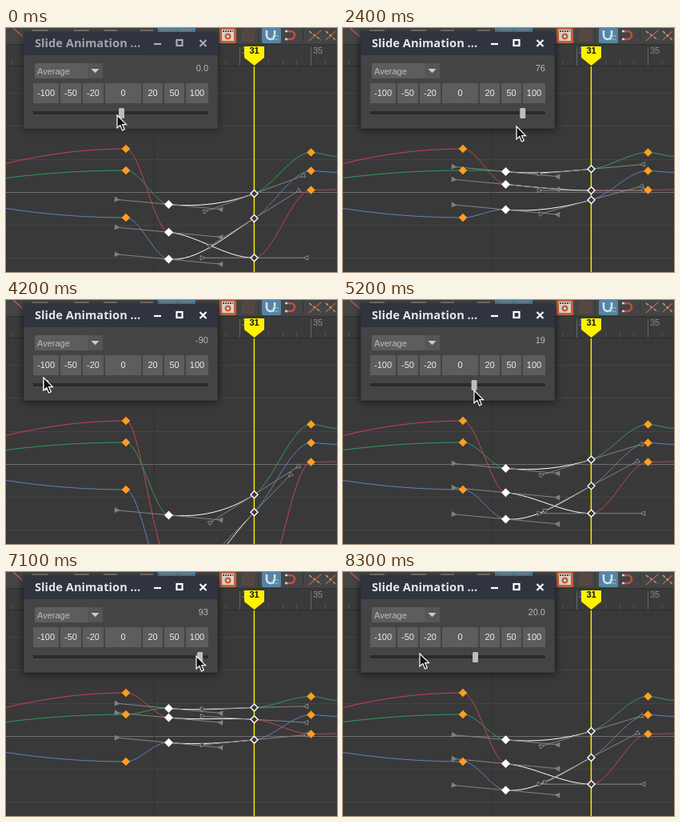
An HTML page that plays this animation: 414x305 px, repeating every 8900 ms.

```html
<!DOCTYPE html>
<html lang="en">
<head>
<meta charset="utf-8">
<title>Slide animation</title>
<style>
  html, body { margin: 0; width: 100%; height: 100%; overflow: hidden; background: #393939; }
  svg { display: block; width: 414px; height: 305px; }
  text { font: 11px "Liberation Sans", Arial, sans-serif; }
  #title { font: bold 11pt "Noto Sans", sans-serif; }
  #now { font-weight: bold; }
</style>
</head>
<body>
<svg id="stage" viewBox="0 0 414 305">
  <defs>
    <filter id="blur" x="-20%" y="-20%" width="140%" height="140%"><feGaussianBlur stdDeviation="4"/></filter>
  </defs>
  <rect width="414" height="305" fill="#393939"/>
  <g id="grid"></g>
  <g id="curves" fill="none"></g>
  <path d="M310.400 46V305" stroke="#fff200" stroke-width="1.400"/>
  <g id="handles"></g>
  <g id="keys"></g>

  <rect y="20" width="414" height="28" fill="#3a3a3a"/>
  <path d="M0 47.5H414" stroke="#2d2d2d"/>
  <g id="ruler"></g>

  <g id="toolbar">
    <rect width="414" height="20" fill="#444"/>
    <path d="M0 20.5H414" stroke="#303030"/>
    <rect x="190" width="47" height="6" fill="#5285a6"/>
    <g fill="none" stroke-width="1.3">
      <path d="M9 0L21 11M379 16L394 3M400 15L412 4" stroke="#c95b45"/>
      <path d="M33 3H52M85 3H104M122 3H139M168 3H184M195 3H210M217 3H232" stroke="#8b8780"/>
      <path d="M379 4L394 15M400 4L412 15" stroke="#b5b0a4" stroke-dasharray="4 2"/>
    </g>
    <rect x="267" width="21" height="19" rx="2" fill="#c4603a"/>
    <rect x="270" y="2" width="15" height="14" fill="#d9d4cf"/>
    <path d="M271 4H284" stroke="#4c4c4c" stroke-width="2" stroke-dasharray="2 1"/>
    <circle cx="277.500" cy="10.500" r="4" fill="#c4603a"/>
    <circle cx="277.500" cy="10.500" r="1.500" fill="#e8e2dc"/>
    <path d="M296 3H310V16H296ZM296 7H310" fill="#57453f" stroke="#5f4f49"/>
    <rect x="320" width="24" height="19" rx="2" fill="#5285a6"/>
    <g fill="none" stroke-width="2.600">
      <path d="M326 3V9A5 5 0 0 0 336 9V3" stroke="#d9dfe3"/>
      <path d="M331 14H341M333 10H341" stroke="#c9d6de" stroke-width="1" stroke-dasharray="2 1"/>
      <path d="M351 4H356A5 5 0 0 1 356 14H351" stroke="#b9543f"/>
      <path d="M349 4H352M349 14H352" stroke="#d0d0d0"/>
    </g>
    <path d="M315.500 1V18M371.500 1V18" stroke="#353535"/>
  </g>
  <path d="M298 23H323V37L310.500 47L298 37Z" fill="#fff200"/>
  <text id="now" x="310.500" y="32" text-anchor="middle" fill="#111">31</text>

  <rect id="shadow" x="21" y="6" width="245" height="122" rx="3" filter="url(#blur)"/>
  <path d="M22 126V8A3 3 0 0 1 25 5H262A3 3 0 0 1 265 8V126Z" fill="#444"/>
  <path d="M22 34V8A3 3 0 0 1 25 5H262A3 3 0 0 1 265 8V34Z" fill="#2f343f"/>
  <path d="M22.500 34V125.500H264.500V34" fill="none" stroke="#393c42"/>
  <text id="title" x="36" y="24">Slide Animation ...</text>
  <g id="controls" fill="none" stroke-width="2.200">
    <path d="M185 20H194"/>
    <rect x="213.500" y="15" width="7" height="7"/>
    <path d="M242.500 15L250.500 23M250.500 15L242.500 23"/>
  </g>
  <rect x="36" y="44" width="66" height="19" rx="1" fill="#5d5d5d"/>
  <rect x="102" y="44" width="19" height="19" rx="1" fill="#555"/>
  <path d="M106.500 51H116.500L111.500 56.200Z" fill="#ccc"/>
  <text x="39" y="58" fill="#bbb">Average</text>
  <text id="value" x="253" y="54" text-anchor="end" fill="#bbb"></text>
  <g id="buttons"></g>
  <rect x="34" y="104" width="219" height="4" rx="1" fill="#2a2a2a"/>
  <rect id="knob" y="100" width="7" height="13" rx="1.500" fill="#bdbdbd"/>
  <path id="cursor" d="M0 0V16L3.800 12.500L6.500 19L9.300 17.800L6.600 11.600H11.500Z" fill="#111" stroke="#fff" stroke-width="1.200"/>
</svg>
<script>
const LOOP = 8900, STEP = 100;
const KEY_X = [150, 203.5, 310.5, 381.5];
const HANDLE = 64.5;
const CURVES = [
  { color: '#c9434f', y: [151, 255.3, 287.3, 202.5], left: 169.5, right: 202 },
  { color: '#2f9c5b', y: [178, 220.5, 207, 155.5], left: 187.5, right: 160.5 },
  { color: '#5b82c4', y: [237, 289, 238, 178.5], left: 225.5, right: 180.5 }
];
// time, slider value, pointer x, pointer y
const TRACK = [
  [0, 0, 139, 109], [100, 0, 141, 109], [200, 0, 141, 109], [900, 37.5, 184, 109],
  [1100, 69, 217, 111], [1700, 100, 260, 115], [1800, 100, 260, 115], [1900, 100, 262, 116],
  [2100, 100, 262, 116], [2400, 76.2, 217, 123], [3000, -22, 118, 114], [3800, -94, 45, 97],
  [4100, -94, 45, 97], [4200, -90, 47, 97], [5000, -12, 131, 111], [5200, 18.6, 164, 113],
  [5900, 75, 223, 110], [6500, 100, 250, 105], [6800, 100, 250, 105], [7100, 93.2, 238, 105],
  [7700, 38, 184, 108], [8000, 24, 169, 109], [8100, 24, 169, 109], [8200, 21, 136, 106],
  [8300, 20, 96, 102]
];

const $ = id => document.getElementById(id);
function add(parent, tag, attrs, label) {
  const node = document.createElementNS('http://www.w3.org/2000/svg', tag);
  set(node, attrs);
  if (label !== undefined) node.textContent = label;
  return $(parent).appendChild(node);
}
function set(node, attrs) {
  for (const name in attrs) node.setAttribute(name, attrs[name]);
}

// Slope through three points, flat at extremes and limited against overshoot.
function autoSlope(x0, y0, x1, y1, x2, y2) {
  const a = (y1 - y0) / (x1 - x0), b = (y2 - y1) / (x2 - x1);
  if (a * b <= 0) return 0;
  const mean = (y2 - y0) / (x2 - x0);
  return Math.sign(a) * Math.min(Math.abs(mean), 3 * Math.abs(a), 3 * Math.abs(b));
}

function sample(t, col) {
  const last = TRACK.length - 1;
  if (t >= TRACK[last][0]) return TRACK[last][col];
  let i = 0;
  while (TRACK[i + 1][0] <= t) i++;
  const slope = k => k === 0 || k === last ? 0 : autoSlope(
    TRACK[k - 1][0], TRACK[k - 1][col], TRACK[k][0], TRACK[k][col], TRACK[k + 1][0], TRACK[k + 1][col]);
  const p = TRACK[i], q = TRACK[i + 1], d = q[0] - p[0], s = (t - p[0]) / d, r = 1 - s;
  return r * r * (1 + 2 * s) * p[col] + s * s * (3 - 2 * s) * q[col]
    + d * s * r * (r * slope(i) - s * slope(i + 1));
}

function segment(x0, y0, m0, x1, y1, m1) {
  const d = (x1 - x0) / 3;
  return `M${x0} ${y0}C${x0 + d} ${y0 + m0 * d} ${x1 - d} ${y1 - m1 * d} ${x1} ${y1}`;
}
const diamond = (x, y, r) => `M${x - r} ${y}L${x} ${y - r}L${x + r} ${y}L${x} ${y + r}Z`;

for (let y = 81.5; y < 305; y += 41.25)
  add('grid', 'path', { d: `M0 ${Math.floor(y) + .5}H414`, stroke: Math.abs(y - 205) < 2 ? '#707070' : '#454545' });
add('grid', 'path', { d: 'M185.5 48V305', stroke: '#313131' });

for (let frame = 14; frame <= 36; frame++) {
  const x = Math.round(310 + (frame - 31) * 17.8) + .5, major = frame % 5 === 0;
  add('ruler', 'path', { d: `M${x} ${major ? 24 : 40}V47`, stroke: major ? '#666' : '#505050' });
  if (major) add('ruler', 'text', { x: x + 2.5, y: 32, fill: '#909090' }, frame);
}

[[-100, 34, 66], [-50, 68, 94], [-20, 96, 122], [0, 124, 169], [20, 171, 196], [50, 198, 223], [100, 225, 253]]
  .forEach(([label, x0, x1]) => {
    add('buttons', 'rect', { x: x0, y: 69, width: x1 - x0, height: 25, rx: 1, fill: '#5d5d5d' });
    add('buttons', 'text', { x: (x0 + x1) / 2, y: 85, 'text-anchor': 'middle', fill: '#eee' }, label);
  });

for (const c of CURVES) {
  c.mean = (c.y[0] + c.y[3]) / 2;
  const startSlope = 2 * (c.y[0] - c.left) / 150;
  add('curves', 'path', {
    d: segment(0, c.left, startSlope, 150, c.y[0], 0) + segment(381.5, c.y[3], 0, 414, c.right, 0),
    stroke: c.color
  });
  c.sides = add('curves', 'path', { stroke: c.color });
  c.middle = add('curves', 'path', { stroke: '#fff' });
  c.lines = add('handles', 'path', { fill: 'none', stroke: '#858585' });
  c.solid = add('handles', 'path', { fill: '#808080' });
  c.hollow = add('handles', 'path', { fill: '#393939', stroke: '#8c8c8c' });
  for (const k of [0, 3])
    add('keys', 'path', { d: diamond(KEY_X[k], c.y[k], 5.3), fill: '#ff9d20' });
  c.keyA = add('keys', 'path', { fill: '#fff' });
  c.keyB = add('keys', 'path', { fill: '#393939', stroke: '#fff', 'stroke-width': 1.4 });
}

// Both handles of one key: the line and the arrowheads that point at the key.
function handlePaths(x, y, slope, size) {
  const len = Math.hypot(1, slope), ux = 1 / len, uy = slope / len;
  let line = '', heads = '';
  for (const side of [-1, 1]) {
    const dx = ux * side, dy = uy * side, hx = x + dx * HANDLE, hy = y + dy * HANDLE;
    const bx = hx + dx * size, by = hy + dy * size;
    line += `M${x} ${y}L${hx} ${hy}`;
    heads += `M${hx - dx * size} ${hy - dy * size}L${bx - dy * size} ${by + dx * size}L${bx + dy * size} ${by - dx * size}Z`;
  }
  return [line, heads];
}

function draw(ms) {
  const t = Math.floor(ms % LOOP / STEP) * STEP;
  const value = sample(t, 1), [x0, xa, xb, x3] = KEY_X;

  for (const c of CURVES) {
    const [y0, a, b, y3] = c.y;
    const ya = a + (c.mean - a) * value / 100, yb = b + (c.mean - b) * value / 100;
    const ma = .094, mb = autoSlope(xa, ya, xb, yb, x3, y3);
    set(c.sides, { d: segment(x0, y0, 0, xa, ya, ma) + segment(xb, yb, mb, x3, y3, 0) });
    set(c.middle, { d: segment(xa, ya, ma, xb, yb, mb) });
    const [lineA, headsA] = handlePaths(xa, ya, ma, 3.5);
    const [lineB, headsB] = handlePaths(xb, yb, mb, 2.8);
    set(c.lines, { d: lineA + lineB });
    set(c.solid, { d: headsA });
    set(c.hollow, { d: headsB });
    set(c.keyA, { d: diamond(xa, ya, 5.5) });
    set(c.keyB, { d: diamond(xb, yb, 4.5) });
  }

  const active = t >= 300, resting = !active || t >= 8300;
  set($('title'), { fill: active ? '#e2e5ea' : '#a0a4ab' });
  set($('controls'), { stroke: active ? '#fff' : '#a9acb2' });
  set($('shadow'), { opacity: active ? .55 : .35 });
  $('value').textContent = resting ? value.toFixed(1) : Math.round(value);
  set($('knob'), { x: 141 + value * 1.053 });
  set($('cursor'), { transform: `translate(${Math.round(sample(t, 2))} ${Math.round(sample(t, 3))})` });
}

const start = performance.now();
function tick() {
  draw(performance.now() - start);
  requestAnimationFrame(tick);
}
tick();
</script>
</body>
</html>
```
